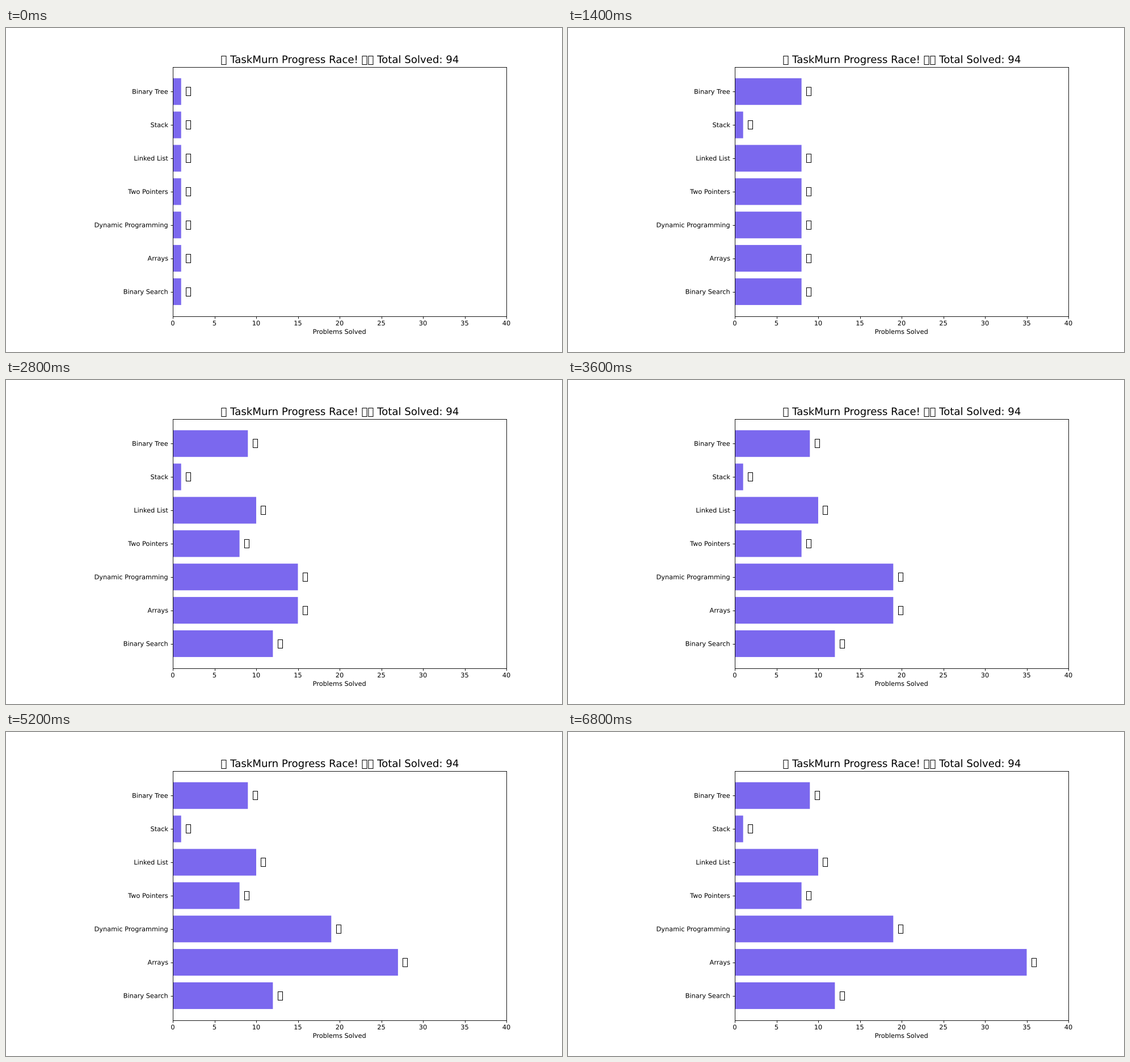
These frames come from a looping animation (980x572 px, 7000 ms). A matplotlib script:

```python
import matplotlib.pyplot as plt
from matplotlib.animation import FuncAnimation
from matplotlib.patheffects import Normal

DPI = 80
SCALE = 245 / 240  # a 12 inch wide layout drawn 980 px wide
FRAMES = 35
INTERVAL = 200
XMAX = 40
GAP = 0.5

SOLVED = {
    "Binary Search": 12,
    "Arrays": 35,
    "Dynamic Programming": 19,
    "Two Pointers": 8,
    "Linked List": 10,
    "Stack": 1,
    "Binary Tree": 9,
}
# Emoji missing from DejaVu Sans show up as empty boxes
ROCKET, FLAG, CUP = "\U0001F680", "\U0001F3C1", "\U0001F3C6"

plt.rcParams.update({
    "font.family": "DejaVu Sans",
    "font.size": 10 * SCALE,
    "axes.linewidth": 0.8 * SCALE,
    "axes.titlepad": 6 * SCALE,
    "axes.labelpad": 4.4 * SCALE,
})
for axis in ("xtick", "ytick"):
    plt.rcParams.update({
        f"{axis}.major.size": 3.5 * SCALE,
        f"{axis}.major.pad": 3.5 * SCALE,
        f"{axis}.major.width": 0.8 * SCALE,
    })

fig, ax = plt.subplots(figsize=(12.25, 7.15), dpi=DPI)
fig.subplots_adjust(left=0.3, right=0.9, bottom=0.11, top=0.88)

goals = list(SOLVED.values())
bars = ax.barh(list(SOLVED), [1] * len(goals), color="mediumslateblue",
               snap=False)
runners = [
    ax.text(1 + GAP, row, ROCKET, va="center", fontsize=16 * SCALE)
    for row in range(len(goals))
]
ax.set_xlim(0, XMAX)
ax.set_ylim(-0.74, len(goals) - 0.26)
ax.set_xlabel("Problems Solved")
ax.set_title(
    f"{ROCKET} TaskMurn Progress Race! {FLAG}{CUP} Total Solved: {sum(goals)}",
    fontsize=16 * SCALE,
)

# Text drawn as outlines keeps its exact width and sub-pixel place
for text in [ax.title, ax.xaxis.label, *ax.get_xticklabels(),
             *ax.get_yticklabels(), *runners]:
    text.set_path_effects([Normal()])


def update(frame):
    """Each bar grows by one problem per step until it reaches its goal."""
    for bar, runner, goal in zip(bars, runners, goals):
        count = min(frame + 1, goal)
        bar.set_width(count)
        runner.set_x(count + GAP)
    return [*bars, *runners]


anim = FuncAnimation(fig, update, frames=FRAMES, interval=INTERVAL,
                     init_func=lambda: update(0), repeat=True, repeat_delay=0)
plt.show()
```
